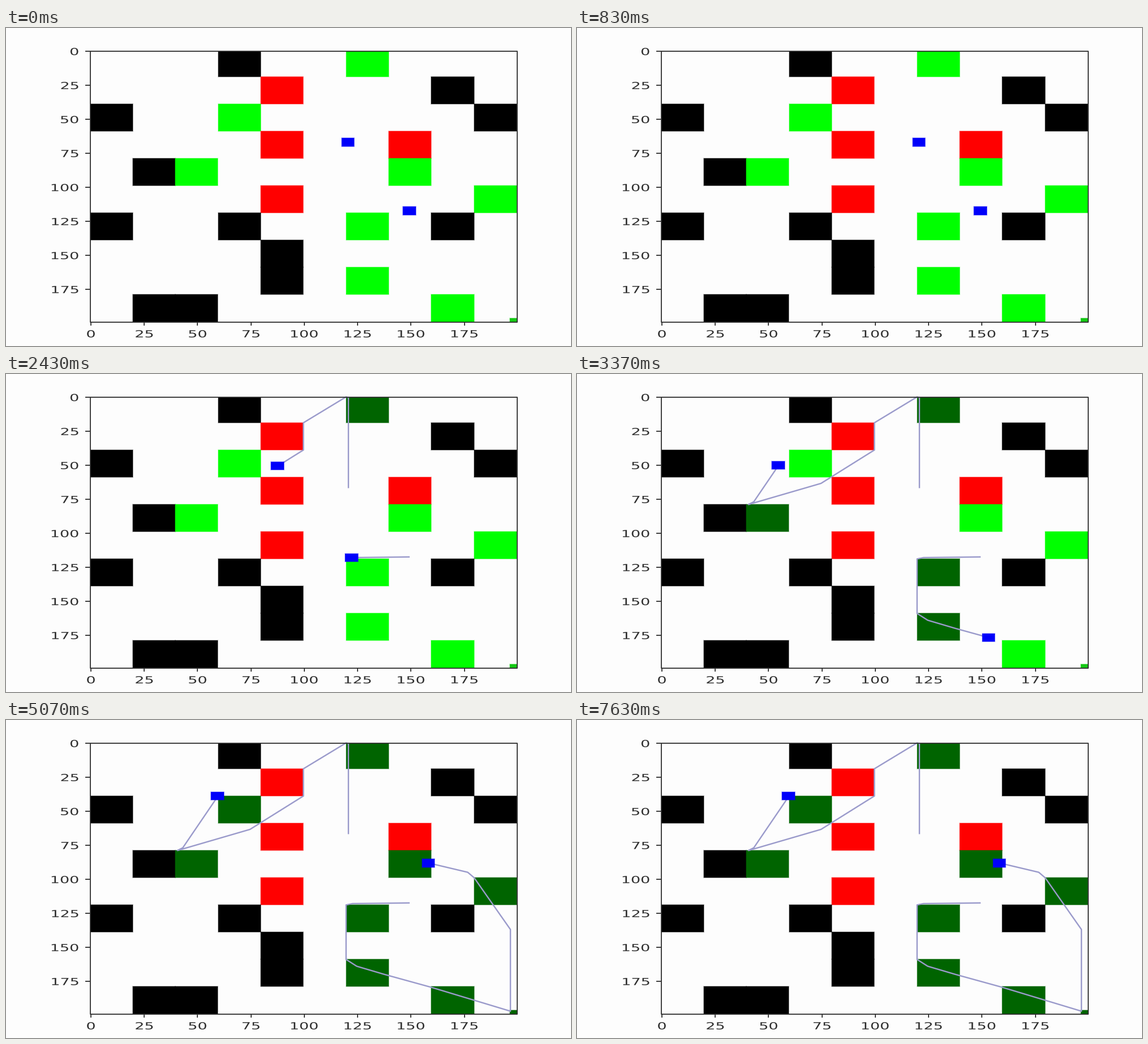
A matplotlib script that plays this animation: 998x561 px, repeating every 8000 ms.

```python
import matplotlib.pyplot as plt
from matplotlib.animation import FuncAnimation
from matplotlib.patches import PathPatch, Rectangle
from matplotlib.textpath import TextPath
from matplotlib.transforms import Affine2D

W, H, DPI = 998, 561, 128
INTERVAL, FRAMES = 40, 200
PX = 72 / DPI
SX, SY = 3.77, 2.4025               # pixels per plot unit
X0, Y0 = 148.3, 38
LEFT, RIGHT, TOP, BOTTOM = 149, 903.5, 40.5, 518.5
CELL = 20

BG, INK, TRAIL, AGENT = "#fdfdfd", "#2e2e2e", "#9a9acb", "#0000fa"
LIME, DARK = "#00ff00", "#006400"
COLORS = {"#": "black", "r": "red", "g": LIME}

GRID = """
...#..g...
....r...#.
#..g.....#
....r..r..
.#g....g..
....r....g
#..#..g.#.
....#.....
....#.g...
.##.....g.
""".split()

# Each agent: lead over the common pace, then its route in plot units.
AGENTS = [
    (43, [(121.1, 68), (121.1, 1.5), (120, 1), (100, 20), (100, 40),
          (75, 64.5), (41, 80), (43.5, 78), (60, 40)]),
    (-49.5, [(149.8, 118.5), (123, 119), (120, 120), (120, 160), (125, 165),
             (138, 171), (160, 180.5), (197, 198), (197, 138), (180, 100),
             (177, 96), (158.7, 89.2)]),
]
PACE = 76.5                         # grid steps between two updates
TICK, UPDATES = 840, (2, 4, 5, 6)   # updates fall on these ticks

fig = plt.figure(figsize=(W / DPI, H / DPI), dpi=DPI, facecolor=BG)
ax = fig.add_axes([0, 0, 1, 1])
ax.set(xlim=(0, W), ylim=(H, 0))
ax.axis("off")
units = Affine2D().scale(SX, SY).translate(X0, Y0) + ax.transData
frame = Rectangle((LEFT, TOP), RIGHT - LEFT, BOTTOM - TOP, transform=ax.transData)


def paint(patch, color):
    patch.set(facecolor=color, edgecolor=(color, 0.4))


def box(x, y, w, h, color, z=1):
    patch = Rectangle((x, y), w, h, lw=1.6 * PX, zorder=z, transform=units)
    paint(patch, color)
    ax.add_patch(patch)
    patch.set_clip_path(frame)
    return patch


def line(xs, ys, color=INK, width=1.8, z=3, **kw):
    return ax.plot(xs, ys, color=color, lw=width * PX, zorder=z,
                   solid_capstyle="butt", solid_joinstyle="round", **kw)[0]


def label(text, x, y, align):
    # Glyphs share the aspect of the whole plot.
    path = TextPath((0, 0), text, size=17.2)
    path = Affine2D().scale(SX / SY, -1).transform_path(path)
    b = path.get_extents()
    dx = x - (b.x1 if align == "right" else (b.x0 + b.x1) / 2)
    path = Affine2D().translate(dx, y - (b.y0 + b.y1) / 2).transform_path(path)
    ax.add_patch(PathPatch(path, fc=INK, lw=0, zorder=3))


def walk(route, steps):
    """Route up to a number of grid steps, diagonals counting as one."""
    trail = [route[0]]
    for (xa, ya), (xb, yb) in zip(route, route[1:]):
        length = max(abs(xb - xa), abs(yb - ya))
        f = min(steps / length, 1)
        trail.append((xa + f * (xb - xa), ya + f * (yb - ya)))
        steps -= length
        if steps <= 0:
            break
    return trail


goals = []
for row, cells in enumerate(GRID):
    for col, kind in enumerate(cells):
        if kind in COLORS:
            patch = box(col * CELL, row * CELL, CELL, CELL, COLORS[kind])
            if kind == "g":
                goals.append((patch, LIME))
goals.append((box(196.8, 197.2, 3.5, 3, "#14c814"), "#14c814"))

line([LEFT, RIGHT, RIGHT, LEFT, LEFT], [TOP, TOP, BOTTOM, BOTTOM, TOP])
for v in range(0, 200, 25):
    x, y = 150 + SX * v, 41 + 2.4 * v
    line([x, x], [BOTTOM, BOTTOM + 6])
    line([LEFT - 9, LEFT], [y, y])
    label(str(v), x, 539.5, "center")
    label(str(v), 127.5, y + 0.5, "right")

artists = [(line([], [], TRAIL, 2.4, 2, transform=units), box(0, 0, 6, 6, AGENT, 4))
           for _ in AGENTS]


def draw(i):
    tick = i * INTERVAL // TICK
    stage = sum(tick >= u for u in UPDATES)
    seen = []
    for (lead, route), (path, marker) in zip(AGENTS, artists):
        steps = PACE * stage + lead if stage else 0
        if stage == len(UPDATES):
            steps = float("inf")
        trail = walk(route, steps)
        path.set_data(*zip(*trail))
        x, y = trail[-1]
        marker.set_xy((x - 3.2, y - 3))
        seen += trail
    for patch, color in goals:
        x, y = patch.get_xy()
        hit = any(0 <= px - x <= patch.get_width() and 0 <= py - y <= patch.get_height()
                  for px, py in seen)
        paint(patch, DARK if hit else color)
    return [g[0] for g in goals] + [a for pair in artists for a in pair]


anim = FuncAnimation(fig, draw, frames=FRAMES, interval=INTERVAL,
                     repeat=True, repeat_delay=0, blit=False)
plt.show()
```
